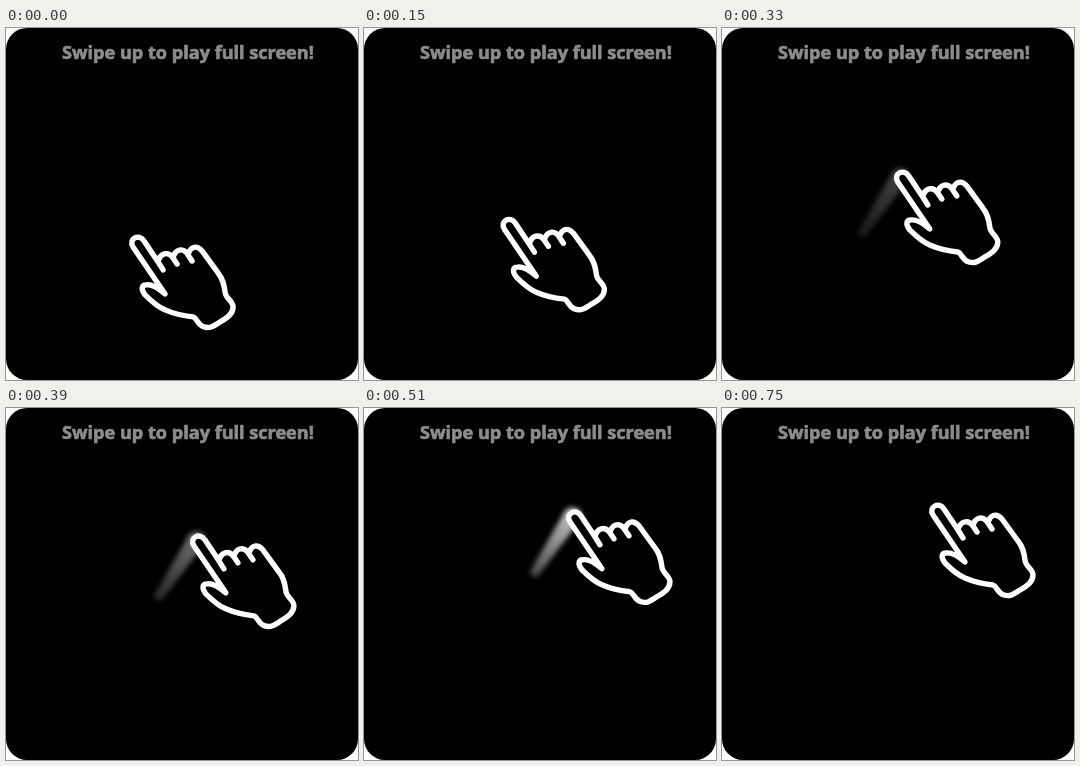
An HTML page for the animation above (900 ms loop, 352 px wide and 352 px high).

```html
<!DOCTYPE html>
<html lang="en">
<head>
<meta charset="utf-8">
<title>Swipe hint</title>
<style>
  html, body { margin: 0; height: 100%; overflow: hidden; background: #fff; }
  svg { display: block; width: 100vw; height: 100vh; }
  text { font: 700 18.1px "Noto Sans", sans-serif; fill: #8c8c8c; stroke: #8c8c8c; stroke-width: .7; }
  #outline { fill: #000; stroke: #fff; stroke-width: 5.4; stroke-linecap: round; stroke-linejoin: round; }
</style>
</head>
<body>
<svg viewBox="0 0 352 352">
  <defs>
    <linearGradient id="fade" gradientUnits="userSpaceOnUse" x1="130" y1="214" x2="91" y2="270">
      <stop stop-color="#fff" stop-opacity=".75"/>
      <stop offset="1" stop-color="#fff" stop-opacity=".3"/>
    </linearGradient>
    <filter id="soft" x="-30%" y="-30%" width="160%" height="160%">
      <feGaussianBlur stdDeviation="2.7"/>
    </filter>
  </defs>
  <rect width="352" height="352" rx="21"/>
  <text x="182" y="31" text-anchor="middle">Swipe up to play full screen!</text>
  <g id="hand">
    <path id="trail" fill="url(#fade)" filter="url(#soft)"
      d="M120 212C123 201 140 203 139 215L96 272C93 276 85 273 88 267Z"/>
    <path id="outline" d="M159 266L127 219C122 211 133 205 138 213L152 234
      C154 225 162 223 167 230C169 221 177 219 182 227C184 218 191 217 196 223
      L212 245C217 251 218 257 219 264C219 270 227 273 227 279C227 286 221 290 214 294
      C208 298 204 301 198 299C191 297 191 290 187 289C178 288 168 286 159 282
      C151 279 145 273 139 267C135 262 135 257 140 257C146 256 152 260 159 266Z
      M152 234L157 242M167 230L171 236M182 227L186 233"/>
  </g>
</svg>
<script>
  const LOOP = 900, STEP = 30, LAST = 750;
  const hand = document.getElementById('hand');
  const trail = document.getElementById('trail');
  const clamp = v => Math.min(1, Math.max(0, v));
  const easeSine = v => (1 - Math.cos(Math.PI * clamp(v))) / 2;

  function draw() {
    const t = Math.min(LAST, Math.floor(performance.now() % LOOP / STEP) * STEP);
    const move = easeSine((t + 12) / 620);
    const glow = clamp((t - 240) / 270) * clamp((LAST - t) / 150);
    hand.setAttribute('transform', `translate(${84 * move} ${-112 * move})`);
    trail.setAttribute('opacity', glow);
    requestAnimationFrame(draw);
  }
  draw();
</script>
</body>
</html>
```
